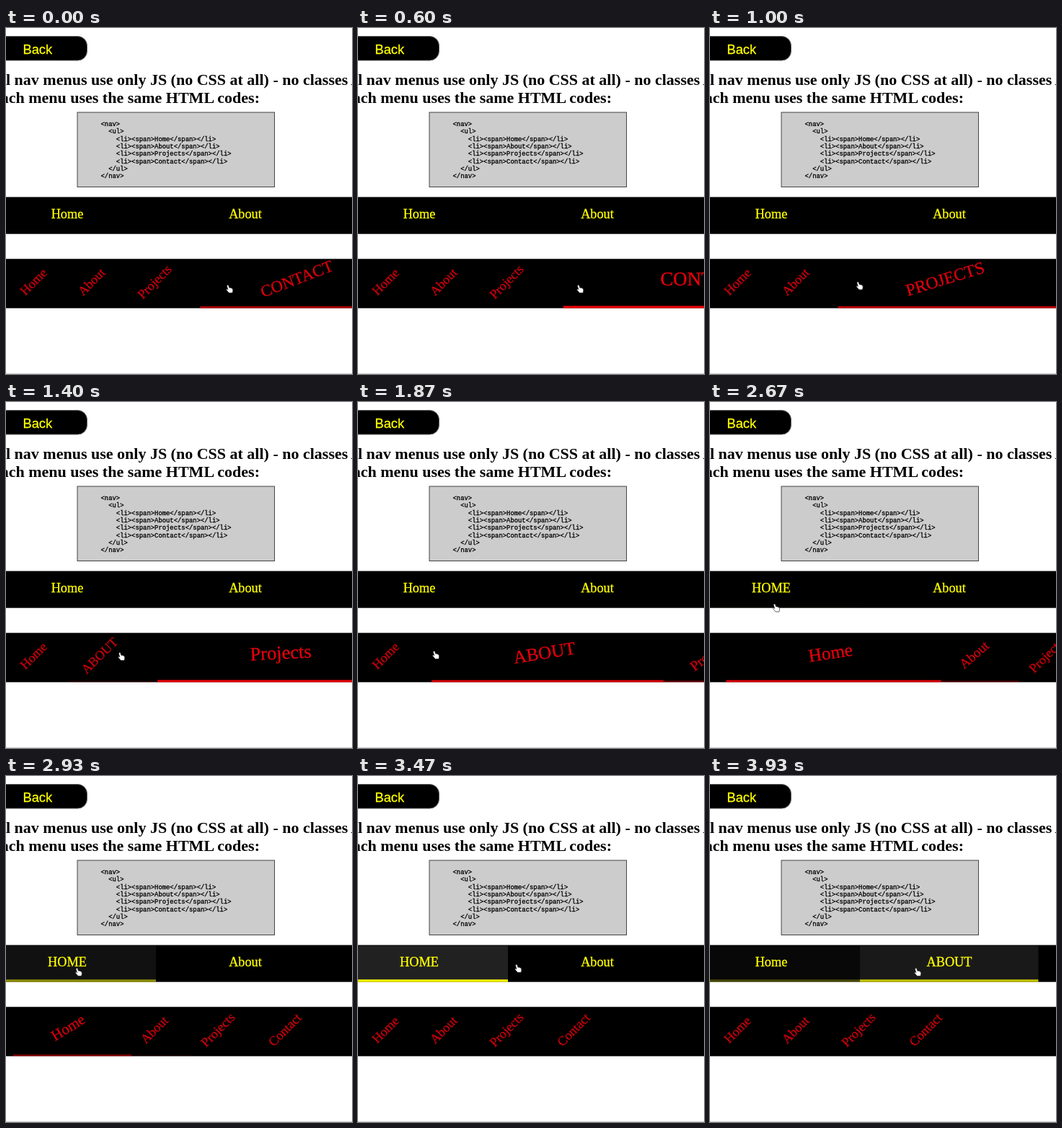
Animation of 480 by 480 pixels, one loop 3990 ms. Source, as an HTML page:

```html
<!DOCTYPE html>
<html lang="en">
<head>
<meta charset="utf-8">
<title>Nav menus</title>
<style>
  html, body { margin: 0; width: 100%; height: 100%; overflow: hidden; background: #fff; }
  svg { display: block; width: 100vw; height: 100vh; }
  text { white-space: pre; stroke-width: .3px; }
  .serif { font-family: "Liberation Serif", "Times New Roman", serif; }
  .mono { font: 8.9px "Liberation Mono", "Courier New", monospace; stroke: #000; }
  .sans { font: 18.3px "Liberation Sans", Arial, sans-serif; }
  .mid { text-anchor: middle; }
</style>
</head>
<body>
<svg id="stage" viewBox="0 0 480 480">
  <rect x="-30" y="11.5" width="142.5" height="33.5" rx="13" stroke="#666"/>
  <text class="sans" x="23.5" y="36" fill="#ff0" stroke="#ff0">Back</text>
  <g class="serif" font-size="22" font-weight="bold">
    <text x="-22" y="78.7">All nav menus use only JS (no CSS at all) - no classes A</text>
    <text x="-22" y="104">Each menu uses the same HTML codes:</text>
  </g>
  <rect x="99" y="117" width="273.5" height="103.5" fill="#ccc" stroke="#444"/>
  <g id="code" class="mono"></g>
  <rect y="234.5" width="480" height="51.2"/>
  <g id="top" class="serif mid" font-size="18.3" fill="#ff0"></g>
  <rect y="320.3" width="480" height="68.4"/>
  <g id="bottom" class="serif mid"></g>
  <rect y="479" width="480" height="1" fill="#ccc"/>
  <path id="hand" fill="#fff" stroke="#222" stroke-width=".8" stroke-linejoin="round"
    d="M-3.2-6 Q-1.8-6.6-1.3-5.2 L-.2-1.8 Q1-2.6 1.7-1.5 Q3-2 3.6-.8 Q5-.8 5.2.6 L5.4 3 L4.6 6.2 L-.8 6.2 L-4.6 1.8 Q-5.2.6-4-.1 L-2.4 1 L-4-4.6 Q-4.2-5.7-3.2-6Z"/>
</svg>
<script>
const LOOP = 3990, STEP = 200 / 3, TRANSITION = 1000;
const $ = id => document.getElementById(id);
const lerp = (a, b, k) => a + (b - a) * k;

function make(parent, tag, attrs = {}) {
  const el = document.createElementNS("http://www.w3.org/2000/svg", tag);
  set(el, attrs);
  return parent.appendChild(el);
}
function set(el, attrs) {
  for (const name in attrs) el.setAttribute(name, attrs[name]);
}

// The CSS "ease" curve, cubic-bezier(.25, .1, .25, 1)
function ease(x) {
  if (x <= 0) return 0;
  if (x >= 1) return 1;
  const bezier = (a, b, s) => 3 * a * s * (1 - s) ** 2 + 3 * b * s * s * (1 - s) + s ** 3;
  let low = 0, high = 1;
  for (let i = 0; i < 24; i++) {
    const mid = (low + high) / 2;
    if (bezier(.25, .25, mid) < x) low = mid; else high = mid;
  }
  return bezier(.1, 1, low);
}

const isHovered = (item, t) => t >= item.enter && t < item.leave;

// An interrupted transition runs back in proportionally less time, as in CSS
function progress(item, t) {
  const risen = ease((Math.min(t, item.leave) - item.enter) / TRANSITION);
  if (t <= item.leave) return risen;
  return risen * (1 - ease((t - item.leave) / (TRANSITION * risen)));
}
const label = (item, t) => isHovered(item, t) ? item.name.toUpperCase() : item.name;

const pen = document.createElement("canvas").getContext("2d");
pen.font = '100px "Liberation Serif", "Times New Roman", serif';
const emWidth = text => pen.measureText(text).width / 100;

const names = ["Home", "About", "Projects", "Contact"];
const codeLines = ["<nav>", "  <ul>",
  ...names.map(name => `    <li><span>${name}</span></li>`), "  </ul>", "</nav>"];
codeLines.forEach((line, i) => {
  make($("code"), "text", { x: 131.5, y: 136 + i * 10.3 }).textContent = line;
});

const topItems = [
  { name: "Home", x: -39, width: 247, center: 85, enter: 2630, leave: 3490 },
  { name: "About", x: 208, width: 247.5, center: 332, enter: 3490, leave: Infinity }
];
for (const item of topItems) {
  const { x, width } = item;
  item.back = make($("top"), "rect", { x, y: 235.5, width, height: 50.2, fill: "#222" });
  item.line = make($("top"), "rect", { x, y: 282.3, width, height: 3.4 });
  item.text = make($("top"), "text", { x: item.center, y: 264, stroke: "#ff0" });
}

const hovers = [[2080, 2620], [1370, 2080], [640, 1370], [-310, 640]];
const bottomItems = names.map((name, i) => ({
  name, enter: hovers[i][0], leave: hovers[i][1],
  line: make($("bottom"), "rect", { fill: "#f00008" }),
  text: make($("bottom"), "text")
}));

const cursorPath = [
  [0, 310, 362], [600, 308, 362], [690, 258, 360], [1070, 196, 357], [1330, 170, 355],
  [1400, 160, 353], [2080, 84, 350], [2330, 70, 351], [2600, 86, 319], [2650, 91, 287],
  [2800, 98, 274], [2930, 100, 272], [3200, 150, 269], [3470, 223, 267], [3930, 288, 272], [LOOP, 288, 272]
];
function cursorAt(t) {
  const i = cursorPath.findIndex(point => point[0] > t);
  const [t0, x0, y0] = cursorPath[i - 1], [t1, x1, y1] = cursorPath[i];
  const k = (t - t0) / (t1 - t0);
  return [lerp(x0, x1, k), lerp(y0, y1, k)];
}

function drawTop(t) {
  for (const item of topItems) {
    const p = progress(item, t);
    set(item.back, { opacity: p });
    set(item.line, { opacity: p });
    item.text.textContent = label(item, t);
  }
}

function drawBottom(t) {
  let x = -2;
  const edges = [];
  for (const item of bottomItems) {
    const p = progress(item, t);
    const size = lerp(18, 27, p), text = label(item, t);
    const half = emWidth(text) * size / 2 + lerp(18, 135, p);
    const center = x + 32 * p + half;
    const middle = 347.7 + 4.3 * (1 - p) ** 4;
    const color = `rgb(${lerp(205, 232, p)},0,12)`;
    edges.push(x + 10 + 22 * p * p);
    item.text.textContent = text;
    set(item.text, {
      "font-size": size,
      y: size * .3375,
      fill: color,
      stroke: color,
      transform: `translate(${center} ${middle}) rotate(${-45 * (1 - p)})`
    });
    const height = lerp(2, 3.2, p);
    set(item.line, { y: 388.7 - height, height, opacity: Math.sqrt(p) });
    x = center + half;
  }
  edges.push(x + 10);
  bottomItems.forEach((item, i) => set(item.line, { x: edges[i], width: edges[i + 1] - edges[i] }));
}

function draw(now) {
  const t = Math.floor((now % LOOP + 4) / STEP) * STEP;
  drawTop(t);
  drawBottom(t);
  set($("hand"), { transform: `translate(${cursorAt(t)}) scale(.88)` });
}

const start = performance.now();
function tick() {
  draw(performance.now() - start);
  requestAnimationFrame(tick);
}
tick();
</script>
</body>
</html>
```
